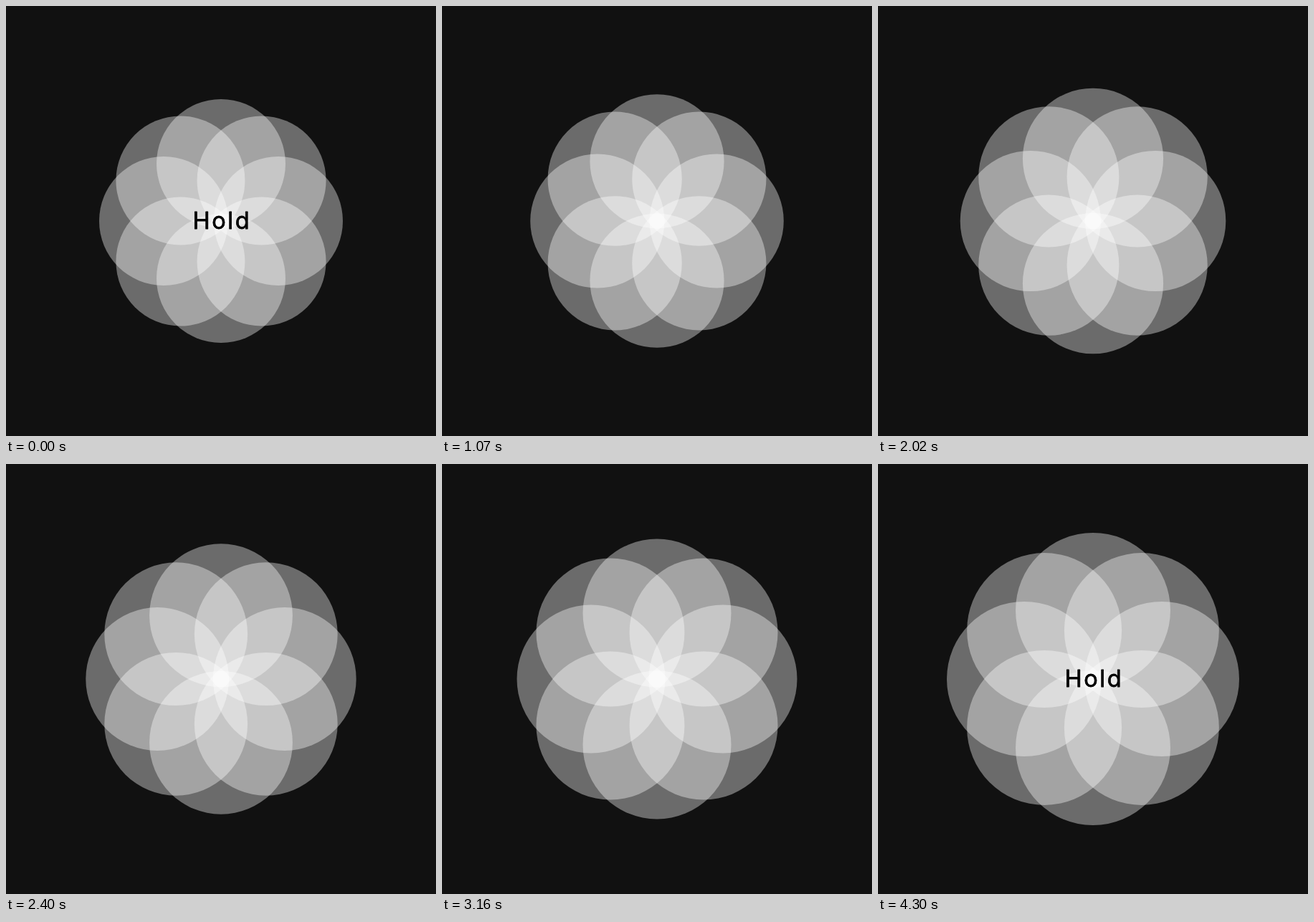
These frames come from a looping animation (600x600 px, 8000 ms). An HTML page:

```html
<!DOCTYPE html>
<html lang="en">
<head>
<meta charset="utf-8">
<title>Breathing flower</title>
<style>
  html, body { margin: 0; width: 100%; height: 100%; overflow: hidden; background: #111; }
  svg { display: block; width: 100%; height: 100%; }
  circle { fill: #fff; fill-opacity: .375; }
  text {
    font: 400 32.5px Inter, sans-serif;
    letter-spacing: 2.6px;
    text-anchor: middle;
    stroke: #000;
    stroke-width: .8;
    stroke-linejoin: round;
  }
</style>
</head>
<body>
<svg viewBox="0 0 600 600">
  <g id="flower"></g>
  <text id="label" x="301.3" y="311.1">Hold</text>
</svg>
<script>
  const LOOP = 8000, GROW_START = 500, STEP = 190, STEPS = 20, LABEL_BACK = 4300;
  const PETALS = 8, RADIUS = 90, OFFSET = 80;
  const flower = document.getElementById('flower');
  const label = document.getElementById('label');

  for (let i = 0; i < PETALS; i++) {
    const angle = i * 2 * Math.PI / PETALS;
    const petal = document.createElementNS('http://www.w3.org/2000/svg', 'circle');
    petal.setAttribute('cx', OFFSET * Math.cos(angle));
    petal.setAttribute('cy', OFFSET * Math.sin(angle));
    petal.setAttribute('r', RADIUS);
    flower.append(petal);
  }

  function draw(time) {
    const t = time % LOOP;
    // The flower grows by one percent per step, then holds.
    const step = t < GROW_START ? 0 : Math.min(STEPS, Math.floor((t - GROW_START) / STEP) + 1);
    flower.setAttribute('transform', `translate(300 300) scale(${1 + step / 100})`);
    label.style.visibility = t < GROW_START || t >= LABEL_BACK ? 'visible' : 'hidden';
  }

  const start = performance.now();
  function tick() {
    draw(performance.now() - start);
    requestAnimationFrame(tick);
  }
  tick();
</script>
</body>
</html>
```
